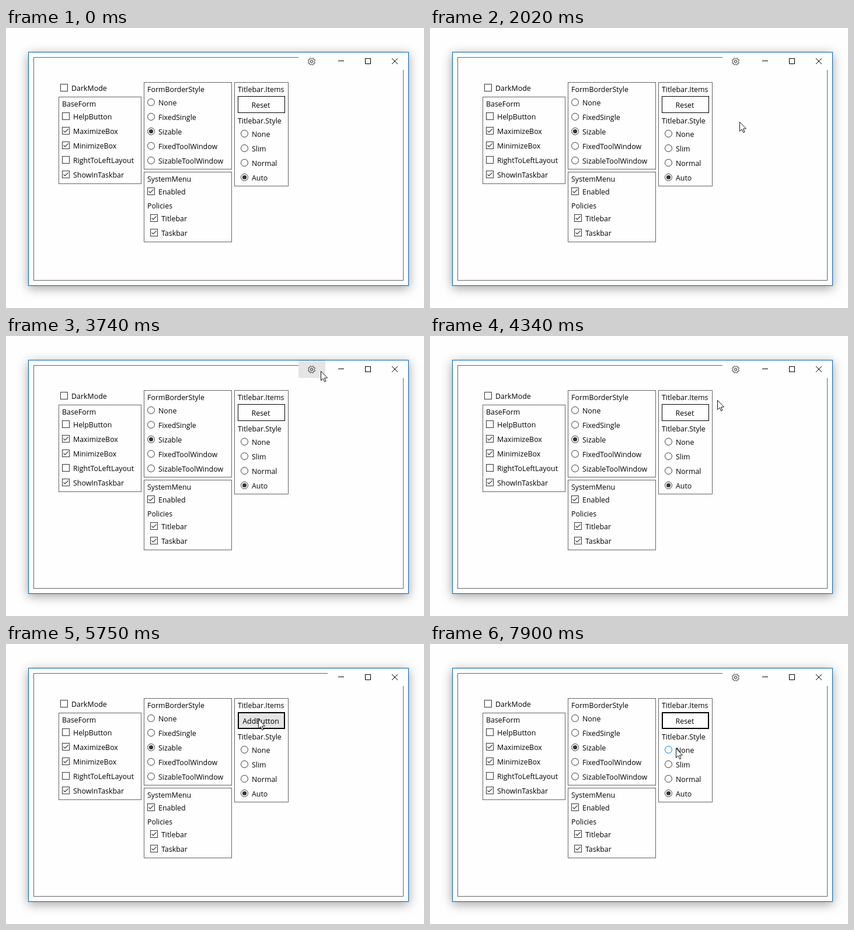
Animation of 716 by 481 pixels, one loop 8 s. Source, as an HTML page with a canvas:

```html
<!DOCTYPE html>
<html lang="en">
<head>
<meta charset="utf-8">
<title>Form settings</title>
<style>
html, body { margin: 0; width: 100%; height: 100%; overflow: hidden; background: #fefefe; }
canvas { display: block; }
</style>
</head>
<body>
<canvas id="stage" width="716" height="481"></canvas>
<script>
const ctx = document.getElementById('stage').getContext('2d');
const LOOP = 8000;
const INK = '#333', LINE = '#646464', PAPER = '#fefefe', HOVER = '#e5e5e5';
const SHOWN = 260, FOCUSED = 790, PRESSED = 5090, CLEARED = 5150, RESTORED = 6350;
const ITEM = 46;

// The pointer glides to each place in turn and rests there: start, end, x, y.
const glides = [
  [0, 0, 525, 433],
  [720, 1280, 530, 336],
  [1670, 2020, 530, 161],
  [2020, 2450, 537, 60],
  [2510, 3000, 608, 60],
  [3000, 3330, 667, 60],
  [3330, 3740, 539, 60],
  [3740, 4140, 509, 97],
  [4140, 4340, 492, 110],
  [4340, 4960, 426, 127],
  [5680, 5750, 432, 129],
  [5750, 5880, 444, 134],
  [7140, 7900, 421, 179]
];

function pointerAt(t) {
  if (t < SHOWN) return null;
  let x = 0, y = 0;
  for (const [start, end, toX, toY] of glides) {
    if (t < start) break;
    const u = Math.min(1, (t - start) / (end - start || 1));
    const k = end ? u : 1;
    x += (toX - x) * k;
    y += (toY - y) * k;
  }
  return { x: Math.round(x), y: Math.round(y) };
}

const inside = (p, x, y, w, h) => !!p && p.x >= x && p.x < x + w && p.y >= y && p.y < y + h;

function fill(x, y, w, h, color) {
  ctx.fillStyle = color;
  ctx.fillRect(x, y, w, h);
}

function frame(x, y, w, h, color = LINE) {
  ctx.strokeStyle = color;
  ctx.lineWidth = 1;
  ctx.strokeRect(x + 0.5, y + 0.5, w, h);
}

function line(color, width, ...pts) {
  ctx.strokeStyle = color;
  ctx.lineWidth = width;
  ctx.beginPath();
  for (let i = 0; i < pts.length; i += 2) ctx.lineTo(pts[i], pts[i + 1]);
  ctx.stroke();
}

function circle(x, y, r) {
  ctx.beginPath();
  ctx.arc(x, y, r, 0, Math.PI * 2);
}

function label(s, x, cy, align = 'left') {
  ctx.font = '12.4px "Open Sans", "Noto Sans", sans-serif';
  ctx.textAlign = align;
  ctx.fillStyle = '#000';
  ctx.fillText(s, x, cy + 5);
}

function check(s, x, cy, on) {
  frame(x, cy - 7, 12, 12, INK);
  if (on) line(INK, 1.2, x + 2.5, cy - 0.7, x + 5, cy + 2, x + 10.7, cy - 3.7);
  label(s, x + 19, cy);
}

function radio(s, x, cy, on, color = INK) {
  ctx.strokeStyle = color;
  ctx.lineWidth = 1;
  circle(x + 6.5, cy - 0.5, 6);
  ctx.stroke();
  if (on) {
    ctx.fillStyle = color;
    circle(x + 6.5, cy - 0.5, 3.6);
    ctx.fill();
  }
  label(s, x + 19, cy);
}

function panel(title, x, y, w, h) {
  frame(x, y, w, h);
  label(title, x + 6, y + 12);
}

function gear(cx, cy) {
  const teeth = 8, points = 64;
  ctx.beginPath();
  for (let i = 0; i < points; i++) {
    const a = i / points * Math.PI * 2;
    const r = 5.5 + 0.7 * Math.tanh(-3 * Math.cos(teeth * a));
    ctx.lineTo(cx + Math.cos(a) * r, cy + Math.sin(a) * r);
  }
  ctx.closePath();
  ctx.strokeStyle = '#111';
  ctx.lineWidth = 1;
  ctx.stroke();
  circle(cx, cy, 2.1);
  ctx.stroke();
}

function drawWindow(border) {
  ctx.save();
  ctx.shadowColor = 'rgba(0,0,0,.37)';
  ctx.shadowBlur = 17;
  ctx.shadowOffsetY = 4;
  fill(38, 41, 652, 402, PAPER);
  ctx.restore();
  frame(38, 41, 651, 401, border);
  frame(47, 50, 633, 383);
}

function drawTitlebar(p, hasGear) {
  const close = 643, max = close - ITEM, min = max - ITEM, extra = 501;
  const left = hasGear ? extra : min;
  const hot = x => inside(p, x, 42, ITEM, 30);
  fill(left, 42, close + ITEM - left, 30, PAPER);
  for (const x of hasGear ? [extra, min, max] : [min, max])
    if (hot(x)) fill(x, 42, ITEM, 30, HOVER);
  if (hot(close)) fill(close, 42, ITEM, 30, '#e81123');
  if (hasGear) gear(523.5, 57.5);
  fill(569, 56, 10, 1, '#000');
  frame(615, 52, 9, 9, '#000');
  const ink = hot(close) ? '#fff' : '#000';
  line(ink, 1, 661, 52, 671, 62);
  line(ink, 1, 671, 52, 661, 62);
}

function drawButton(p, t, cleared) {
  const down = t >= PRESSED && t < CLEARED;
  if (inside(p, 397, 117, 81, 29)) fill(398, 118, 79, 27, down ? '#ccc' : HOVER);
  frame(397, 117, 80, 28, '#000');
  if (t >= PRESSED) frame(398, 118, 78, 26, '#000');
  label(cleared ? 'AddButton' : 'Reset', 436.5, 132, 'center');
}

function drawPanels(p) {
  const row = 25;
  check('DarkMode', 93, 103, false);

  panel('BaseForm', 90, 118, 141, 149);
  ['HelpButton', 'MaximizeBox', 'MinimizeBox', 'RightToLeftLayout', 'ShowInTaskbar']
    .forEach((s, i) => check(s, 96, 152 + row * i, i % 3 !== 0));

  panel('FormBorderStyle', 236, 93, 150, 149);
  ['None', 'FixedSingle', 'Sizable', 'FixedToolWindow', 'SizableToolWindow']
    .forEach((s, i) => radio(s, 242, 128 + row * i, i === 2));

  panel('SystemMenu', 236, 247, 150, 120);
  check('Enabled', 242, 281, true);
  label('Policies', 242, 305);
  ['Titlebar', 'Taskbar'].forEach((s, i) => check(s, 247, 327 + row * i, true));

  panel('Titlebar.Items', 391, 93, 92, 178);
  label('Titlebar.Style', 397, 159);
  ['None', 'Slim', 'Normal', 'Auto'].forEach((s, i) => {
    const cy = 182 + row * i;
    radio(s, 402, cy, i === 3, inside(p, 402, cy - 9, 52, 18) ? '#0078d7' : INK);
  });
}

function drawPointer(p) {
  const tip = [0, 0, 0, 16, 3.7, 12.6, 6.2, 18.2, 8.5, 17.2, 6, 11.7, 11, 11.4];
  ctx.beginPath();
  for (let i = 0; i < tip.length; i += 2) ctx.lineTo(p.x + 0.5 + tip[i], p.y + 0.5 + tip[i + 1]);
  ctx.closePath();
  ctx.fillStyle = '#fff';
  ctx.fill();
  ctx.strokeStyle = '#111';
  ctx.lineWidth = 1;
  ctx.stroke();
}

function draw(t) {
  const p = pointerAt(t);
  const cleared = t >= CLEARED && t < RESTORED;
  const blurred = t >= SHOWN && t < FOCUSED;
  fill(0, 0, 716, 481, PAPER);
  drawWindow(blurred ? '#aaa' : '#0063b1');
  drawTitlebar(p, !cleared);
  drawPanels(p);
  drawButton(p, t, cleared);
  if (p) drawPointer(p);
}

const begin = performance.now();
function tick() {
  draw((performance.now() - begin) % LOOP);
  requestAnimationFrame(tick);
}
tick();
</script>
</body>
</html>
```
